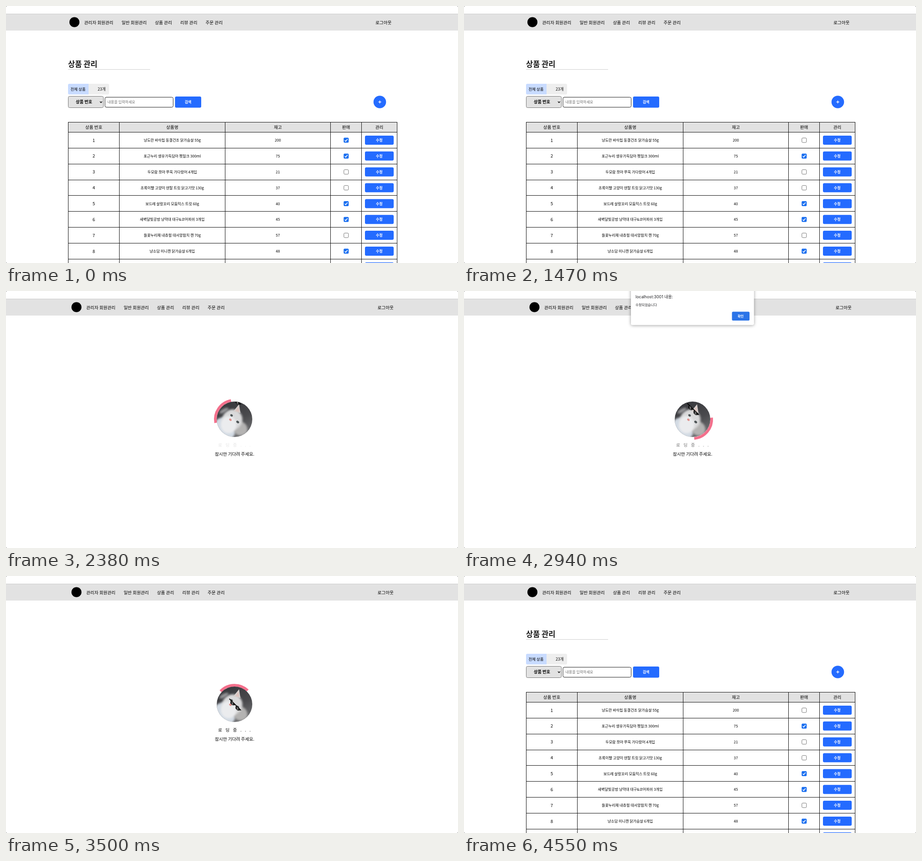
Animation of 991 by 565 pixels, one loop 4760 ms. Source, as an HTML page with a canvas:

```html
<!DOCTYPE html>
<html lang="ko">
<head>
<meta charset="utf-8">
<title>상품 관리</title>
<style>
html, body { margin: 0; width: 100%; height: 100%; overflow: hidden; background: #fff; }
canvas { display: block; width: 991px; height: 565px; }
</style>
</head>
<body>
<canvas id="stage"></canvas>
<script>
const W = 991, H = 565, LOOP = 4760, STEP = 70;
const UNCHECK = 1470, LOAD_START = 1960, DIALOG_START = 2450, DIALOG_END = 3360, LOAD_END = 3570;
const BLUE = '#246bff', GREY = '#e2e2e2';
const KR = '"Noto Sans CJK KR", "Noto Sans CJK", sans-serif';
const UI = 'Inter, ' + KR;

const canvas = document.getElementById('stage');
const dpr = window.devicePixelRatio || 1;
canvas.width = W * dpr;
canvas.height = H * dpr;
const ctx = canvas.getContext('2d');

const menu = [['관리자 회원관리', 171.5], ['일반 회원관리', 253.5], ['상품 관리', 326.5],
  ['리뷰 관리', 382], ['주문 관리', 437.5], ['로그아웃', 810]];
const columns = [136, 248, 480, 711, 779, 857];
const headings = ['상품 번호', '상품명', '재고', '판매', '관리'];
const products = [
  ['냥도란 바삭칩 동결건조 닭가슴살 55g', 200, true],
  ['포근누리 생유가득담아 펫밀크 300ml', 75, true],
  ['두모람 쪼아 쭈욱 가다랑어 4개입', 21, false],
  ['초록이빨 고양이 덴탈 트릿 닭고기맛 130g', 37, false],
  ['보드레 살랑꼬리 모둠믹스 트릿 60g', 40, true],
  ['새벽달빛공방 냥막대 대구&코어피쉬 3개입', 45, true],
  ['들꽃누리채 내츄럴 대서양참치 캔 70g', 57, false],
  ['냥소담 미니캔 닭가슴살 6개입', 48, true],
  ['', '', true]
];

// Text is placed by its vertical middle.
function text(str, x, y, size, o = {}) {
  ctx.font = `${o.weight || 500} ${size}px ${o.font || KR}`;
  ctx.textAlign = o.align || 'left';
  ctx.fillStyle = o.color || '#000';
  ctx.letterSpacing = (o.spacing || 0) + 'px';
  ctx.fillText(str, x, y + size * 0.37);
}

function label(str, x, y, size, o) {
  text(str, x, y, size, { align: 'center', ...o });
}

function rect(x, y, w, h, color) {
  ctx.fillStyle = color;
  ctx.fillRect(x, y, w, h);
}

function box(x, y, w, h, r, fill, stroke) {
  ctx.beginPath();
  ctx.roundRect(x, y, w, h, r);
  ctx.fillStyle = fill;
  ctx.fill();
  if (stroke) {
    ctx.strokeStyle = stroke;
    ctx.lineWidth = 1;
    ctx.stroke();
  }
}

function disc(x, y, rx, ry, color, turn = 0) {
  ctx.beginPath();
  ctx.ellipse(x, y, rx, ry, turn, 0, Math.PI * 2);
  ctx.fillStyle = color;
  ctx.fill();
}

function shape(points, color) {
  ctx.beginPath();
  points.forEach(([x, y]) => ctx.lineTo(x, y));
  ctx.fillStyle = color;
  ctx.fill();
}

function line(points, color, width) {
  ctx.beginPath();
  points.forEach(([x, y]) => ctx.lineTo(x, y));
  ctx.strokeStyle = color;
  ctx.lineWidth = width;
  ctx.stroke();
}

function bezier(x1, y1, x2, y2) {
  const at = (a, b, s) => 3 * a * s * (1 - s) ** 2 + 3 * b * s * s * (1 - s) + s ** 3;
  return x => {
    let lo = 0, hi = 1;
    for (let i = 0; i < 24; i++) {
      const mid = (lo + hi) / 2;
      if (at(x1, x2, mid) < x) lo = mid; else hi = mid;
    }
    return at(y1, y2, lo);
  };
}
const ease = bezier(0.25, 0.1, 0.25, 1);
const easeInOut = bezier(0.42, 0, 0.58, 1);

function header(shift) {
  rect(0, 17, W, 37, GREY);
  rect(0, 17, W, 1, '#cbcbcb');
  disc(150 + shift, 35.5, 11, 11, '#000');
  menu.forEach(([str, x]) => text(str, x + shift, 36, 9.6));
}

function checkbox(x, y, on) {
  if (!on) return box(x - 5, y - 5, 10, 10, 2, '#fff', '#767676');
  box(x - 5.5, y - 5.5, 11, 11, 2, '#1a6ff0');
  line([[x - 3, y + 0.3], [x - 1, y + 2.4], [x + 3, y - 2.6]], '#fff', 1.6);
}

function toolbar() {
  text('상품 관리', 136, 128, 16.5, { weight: 700, color: '#1a1a1a' });
  rect(136, 139, 180, 1, '#cfcfcf');
  box(136, 171, 45, 23.5, [3, 0, 0, 3], '#c8dbff');
  box(181, 171, 45, 23.5, [0, 3, 3, 0], '#eee');
  text('전체 상품', 141.5, 182.5, 8.45);
  text('23개', 201, 182.5, 8.6);

  box(136.5, 198.5, 77, 25, 3, GREY, '#777');
  text('상품 번호', 153, 211, 9.2, { weight: 700 });
  line([[206, 210], [208.3, 212.5], [210.6, 210]], '#000', 1.4);
  box(217, 200.5, 149.5, 22, 3, '#fff', '#222');
  text('내용을 입력하세요', 222.5, 211.5, 8, { color: '#707070' });
  box(370.5, 199, 57.5, 24.5, 3, BLUE);
  label('검색', 399, 211.3, 8, { weight: 700, color: '#fff' });
  disc(819.5, 211, 13.8, 13.8, BLUE);
  line([[816.3, 211], [822.7, 211]], '#fff', 1.4);
  line([[819.5, 207.8], [819.5, 214.2]], '#fff', 1.4);
}

function table(t) {
  const pitch = 34.85, top = 277;
  const middle = i => (columns[i] + columns[i + 1] + 1) / 2;
  rect(136, 255, 722, 23, GREY);
  headings.forEach((str, i) => label(str, middle(i), 266.3, 9.6));
  products.forEach(([name, stock, sale], i) => {
    const y = 295 + i * pitch;
    label(String(i + 1), middle(0), y, 9.6);
    label(name, middle(1), y + 0.2, 8.1);
    label(String(stock), middle(2), y + 0.2, 8.1);
    checkbox(745.8, y + 0.1, i ? sale : t < UNCHECK);
    box(787, y - 10, 63, 20, 3, BLUE);
    label('수정', 818.3, y + 0.2, 8, { weight: 700, color: '#fff' });
    rect(136, Math.round(top + i * pitch), 722, 1, '#111');
  });
  rect(136, 255, 722, 1, '#111');
  columns.forEach(x => rect(x, 255, 1, H - 255, '#111'));
}

function glasses(y) {
  ctx.save();
  ctx.translate(502, y);
  ctx.rotate(Math.PI / 4);
  rect(-18, -1.5, 36, 2, '#050505');
  for (const x of [-12, 4]) {
    shape([[x, -1], [x + 12, -1], [x + 12, 2], [x + 9, 5], [x + 3, 5], [x, 2]], '#050505');
    for (let k = 0; k < 3; k++) {
      rect(x + 2.5 + k * 1.4, k * 1.4, 1.2, 1.2, '#fff');
      rect(x + 5.3 + k * 1.4, k * 1.4, 1.2, 1.2, '#fff');
    }
  }
  ctx.restore();
}

function portrait(t) {
  ctx.save();
  ctx.beginPath();
  ctx.arc(501, 282, 39, 0, Math.PI * 2);
  ctx.clip();
  const back = ctx.createLinearGradient(490, 243, 525, 322);
  back.addColorStop(0, '#38393d');
  back.addColorStop(0.5, '#4a4a4d');
  back.addColorStop(1, '#77787a');
  rect(460, 240, 82, 84, back);

  ctx.filter = `blur(${2 * dpr}px)`;
  disc(478, 304, 26, 27, '#d3dbe4', 0.5);
  disc(513, 302, 17, 15, '#b4b3b2', 0.7);
  disc(496, 283, 22, 23, '#d9d9da', 0.6);
  disc(488, 294, 17, 19, '#ebecee');
  disc(478, 263, 11, 4, '#97979a', -0.5);
  ctx.filter = 'none';
  shape([[498, 265], [511, 249], [514, 268]], '#d6d0ce');
  shape([[503, 264], [510, 253], [511, 266]], '#dcc3be');
  disc(494.5, 273.5, 3, 2.3, '#4e5557', 0.6);
  disc(508, 288, 3.4, 2.5, '#4e5557', 0.6);
  disc(492, 283, 3, 2.2, '#df8f8c', 0.7);
  glasses(260 + (t - 2940) * 0.041);
  ctx.restore();
}

function loading(t) {
  const spin = -135 + 360 * ease(((t - 1930) / 822) % 1);
  const start = spin * Math.PI / 180;
  ctx.beginPath();
  ctx.arc(501, 282.2, 42, start, start + Math.PI / 2);
  ctx.strokeStyle = '#f3708c';
  ctx.lineWidth = 6;
  ctx.stroke();
  portrait(t);

  ctx.globalAlpha = easeInOut(Math.min(1, (t - LOAD_START) / 1900));
  text('로딩중...', 465, 338, 9.6, { spacing: 7.4, weight: 400 });
  ctx.globalAlpha = 1;
  text('잠시만 기다려 주세요.', 458, 358.3, 9.6);
}

// The shadow falls only outside the panel, so a fading panel stays white.
function panel(x, y, w, h) {
  ctx.save();
  ctx.beginPath();
  ctx.rect(x - 20, y - 20, w + 40, h + 40);
  ctx.roundRect(x, y, w, h, 3);
  ctx.clip('evenodd');
  ctx.shadowColor = 'rgba(0,0,0,.4)';
  ctx.shadowBlur = 7 * dpr;
  ctx.shadowOffsetY = dpr;
  box(x, y, w, h, 3, '#fff');
  ctx.restore();
  box(x, y, w, h, 3, '#fff');
}

function dialog(t) {
  const gone = Math.max(0, (t - DIALOG_END) / STEP + 1);
  ctx.save();
  ctx.globalAlpha = [1, 0.9, 0.3][gone > 1 ? 2 : gone > 0 ? 1 : 0];
  ctx.translate(501, -1.3 * gone);
  ctx.scale(1 - 0.004 * gone, 1 - 0.004 * gone);
  ctx.translate(-501, 0);
  panel(366, -12, 269.5, 86.5);
  text('localhost:3001 내용:', 376, 12.6, 8.9, { font: UI, weight: 400, color: '#202124' });
  text('수정되었습니다', 376, 30.3, 7.3, { color: '#202124' });
  box(587.5, 45.5, 38.5, 19.5, 2.5, '#2b74e8');
  label('확인', 606.6, 55.3, 7.2, { weight: 700, color: '#fff' });
  ctx.restore();
}

function corners() {
  ctx.beginPath();
  ctx.rect(0, 0, W, H);
  ctx.roundRect(0, 0, W, H, 3);
  ctx.fillStyle = '#888';
  ctx.fill('evenodd');
}

function draw(now) {
  const t = Math.floor((now % LOOP) / STEP) * STEP;
  const busy = t >= LOAD_START && t < LOAD_END;
  ctx.setTransform(dpr, 0, 0, dpr, 0, 0);
  rect(0, 0, W, H, '#fff');
  header(busy ? 4.5 : 0);
  if (busy) {
    loading(t);
    if (t >= DIALOG_START && t < DIALOG_END + 2 * STEP) dialog(t);
  } else {
    toolbar();
    table(t);
  }
  corners();
}

const begin = performance.now();
function tick() {
  draw(performance.now() - begin);
  requestAnimationFrame(tick);
}
tick();
</script>
</body>
</html>
```
